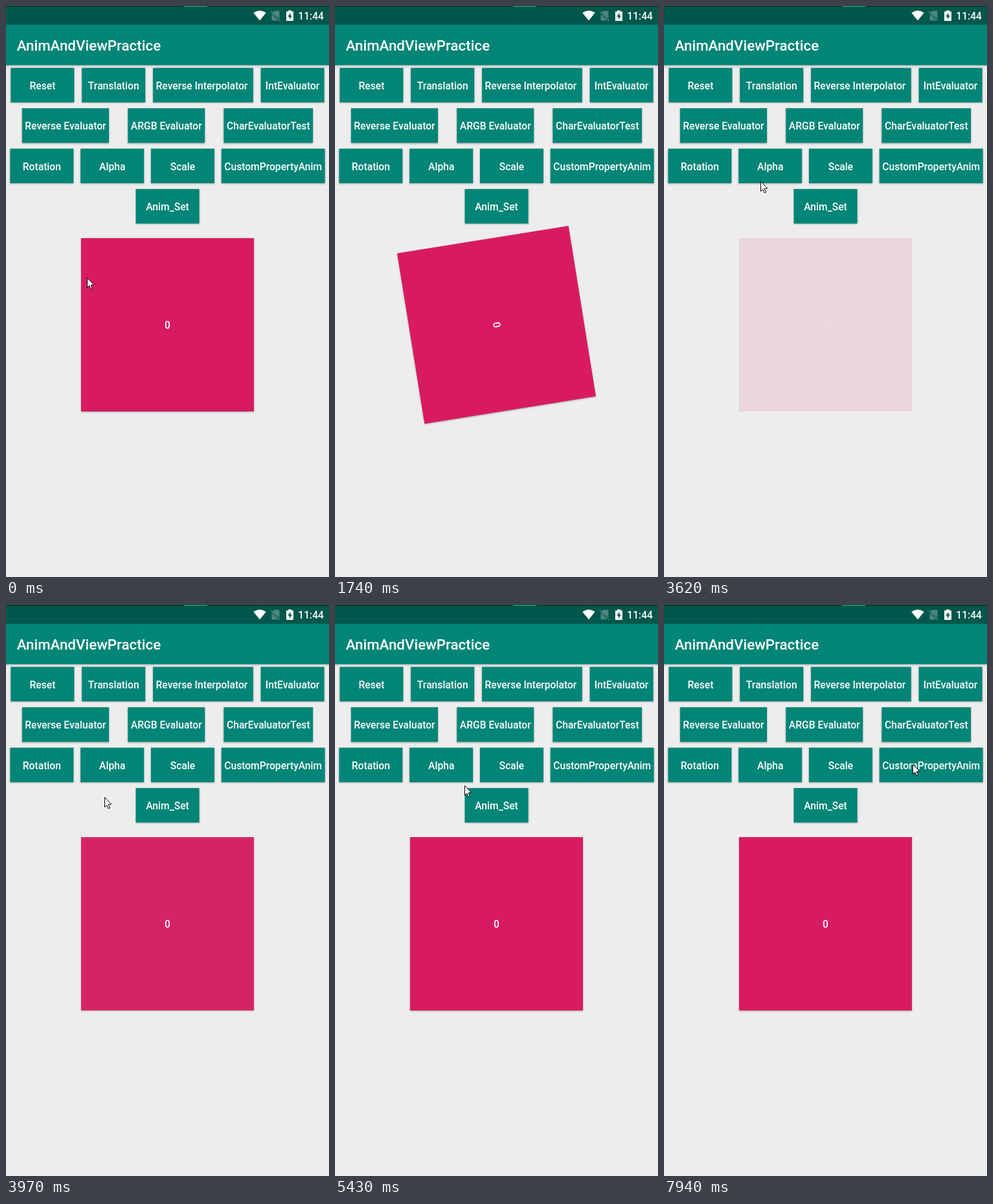
Recreate the animation shown at these times as an HTML page with a canvas. Size 499 px wide and 883 px high, loop 7990 ms.

```html
<!DOCTYPE html>
<html lang="en">
<head>
<meta charset="utf-8">
<title>AnimAndViewPractice</title>
<style>
  html, body { margin: 0; width: 100%; height: 100%; overflow: hidden; background: #ededed; }
  canvas { display: block; }
</style>
</head>
<body>
<canvas id="stage" width="499" height="883"></canvas>
<script>
const canvas = document.getElementById('stage');
const ctx = canvas.getContext('2d');
const W = canvas.width, H = canvas.height;
const LOOP = 7990;
const TEAL = '#008577', DARK = '#00574b', PINK = '#d81b60', BG = '#ededed';
const FONT = 'Roboto, "Noto Sans", sans-serif';
const LABEL_SIZE = 15.65;
const BUTTON = { top: 95.7, pitch: 62.45, height: 53.4, minWidth: 98, padding: 9, inset: 4.4 };

const LABELS = [
  'Reset', 'Translation', 'Reverse Interpolator ', 'IntEvaluator',
  'Reverse Evaluator', 'ARGB Evaluator', 'CharEvaluatorTest',
  'Rotation', 'Alpha', 'Scale', 'CustomPropertyAnim', 'Anim_Set'
];
const PRESSES = { Rotation: 990, Alpha: 3100 };

// Pointer moves: begin, end, target position
const HOME = [124, 420];
const MOVES = [
  [0, 230, 325, 486], [230, 600, 0, 203], [600, 800, 46, 252], [2520, 2730, 147, 252],
  [3450, 3850, 152, 297], [5130, 5900, 274, 252], [7640, 7940, 384, 246]
];

const clamp = v => Math.min(1, Math.max(0, v));
const ramp = (t, from, to) => clamp((t - from) / (to - from));
const ease = (t, start, length) => (1 - Math.cos(Math.PI * ramp(t, start, start + length))) / 2;
const thereAndBack = f => 1 - Math.abs(1 - 2 * f);

function setFont(size) {
  ctx.font = `500 ${size}px ${FONT}`;
}

// Wrap the buttons into rows and space each row evenly
function layout() {
  setFont(LABEL_SIZE);
  const { top, pitch, height, minWidth, padding, inset } = BUTTON;
  const rows = [[]];
  let used = 0;
  for (const label of LABELS) {
    const w = Math.max(minWidth, ctx.measureText(label).width + padding);
    const full = w + 2 * inset;
    if (used + full > W) {
      rows.push([]);
      used = 0;
    }
    used += full;
    rows[rows.length - 1].push({ label, w });
  }
  return rows.flatMap((row, r) => {
    const total = row.reduce((sum, b) => sum + b.w + 2 * inset, 0);
    const gap = (W - total) / (row.length + 1);
    let x = 0;
    return row.map(({ label, w }) => {
      const box = { label, w, h: height, x: x + gap + inset, y: top + r * pitch };
      x = box.x + w + inset;
      return box;
    });
  });
}

function shape(color, points) {
  ctx.fillStyle = color;
  ctx.beginPath();
  points.forEach(([x, y]) => ctx.lineTo(x, y));
  ctx.closePath();
  ctx.fill();
}

function text(str, x, y, size, align = 'center') {
  setFont(size);
  ctx.textAlign = align;
  ctx.fillStyle = '#fff';
  ctx.fillText(str, x, y);
}

function rect(color, x, y, w, h) {
  ctx.fillStyle = color;
  ctx.fillRect(x, y, w, h);
}

function raised(color, x, y, w, h, lift = 0, shade = 1) {
  ctx.save();
  ctx.shadowColor = `rgba(0,0,0,${0.33 * shade})`;
  ctx.shadowBlur = 2.5 + 4 * lift;
  ctx.shadowOffsetY = 1 + 2 * lift;
  rect(color, x, y, w, h);
  ctx.restore();
}

function statusIcons() {
  ctx.fillStyle = '#fff';
  ctx.beginPath();
  ctx.moveTo(392, 22.5);
  ctx.lineTo(382.3, 10.4);
  ctx.quadraticCurveTo(392, 3.4, 401.7, 10.4);
  ctx.fill();

  const grey = '#4d867d';
  shape(grey, [[411.5, 10.5], [414.5, 7.5], [422.5, 7.5], [422.5, 19.5]]);
  shape(grey, [[410.5, 12.5], [420.5, 22.5], [410.5, 22.5]]);
  ctx.strokeStyle = grey;
  ctx.lineWidth = 1.4;
  ctx.beginPath();
  ctx.moveTo(409, 8.5);
  ctx.lineTo(423.5, 23);
  ctx.stroke();

  rect('#fff', 433, 8.5, 11, 14.5);
  rect('#fff', 436, 6.8, 5, 2);
  shape(DARK, [[439.5, 10.5], [435.2, 16.5], [437.8, 16.5], [437.8, 21], [442, 14.8], [439.5, 14.8]]);
}

function chrome() {
  rect(BG, 0, 0, W, H);
  raised(TEAL, -10, 29, W + 20, 62.5, 0.4);
  rect(DARK, 0, 0, W, 29);
  rect('#16231f', 0, 0, W, 1);
  rect('#20b486', 275, 0, 36, 1);
  statusIcons();
  text('11:44', 491, 21, LABEL_SIZE, 'right');
  text('AnimAndViewPractice', 16.7, 69, 22.33, 'left');
}

function drawButtons(t) {
  for (const { label, x, y, w, h } of buttons) {
    const press = PRESSES[label];
    const lift = t >= press ? 1 - ramp(t, press, press + 250) : 0;
    raised(TEAL, x, y, w, h, lift);
    text(label, x + w / 2, y + 33, LABEL_SIZE);
  }
}

function panel(t) {
  const angle = t < 1920 ? 720 * ease(t, 983, 1000) : 0;
  const stretch = 1 + 1.5 * thereAndBack(ease(t, 5931, 920));
  const fadeStart = t < 4086 ? 3086 : 4086;
  const alpha = 1 - thereAndBack(ease(t, fadeStart, 1000));
  ctx.save();
  ctx.translate(249.5, 493);
  ctx.rotate(angle * Math.PI / 180);
  ctx.scale(stretch, 1);
  ctx.globalAlpha = alpha;
  raised(PINK, -133.5, -134, 267, 268, 0, alpha ** 4);
  text('0', 0, 6, LABEL_SIZE);
  ctx.restore();
}

function pointer(t) {
  if (t >= PRESSES.Rotation && t < 2670) return;
  let [x, y] = HOME;
  for (const [from, to, tx, ty] of MOVES) {
    const f = ramp(t, from, to);
    x += (tx - x) * f;
    y += (ty - y) * f;
  }
  ctx.save();
  ctx.translate(Math.round(x), Math.round(y));
  shape('#fff', [[0.5, 0.5], [0.5, 15.5], [3.8, 12.4], [6.2, 18], [8.4, 17], [6.1, 11.4], [10.8, 11]]);
  ctx.strokeStyle = '#000';
  ctx.lineWidth = 1;
  ctx.stroke();
  ctx.restore();
}

function draw(now) {
  const t = Math.max(0, now - start) % LOOP;
  chrome();
  drawButtons(t);
  panel(t);
  pointer(t);
  requestAnimationFrame(draw);
}

const buttons = layout();
const start = performance.now();
draw(start);
</script>
</body>
</html>
```
